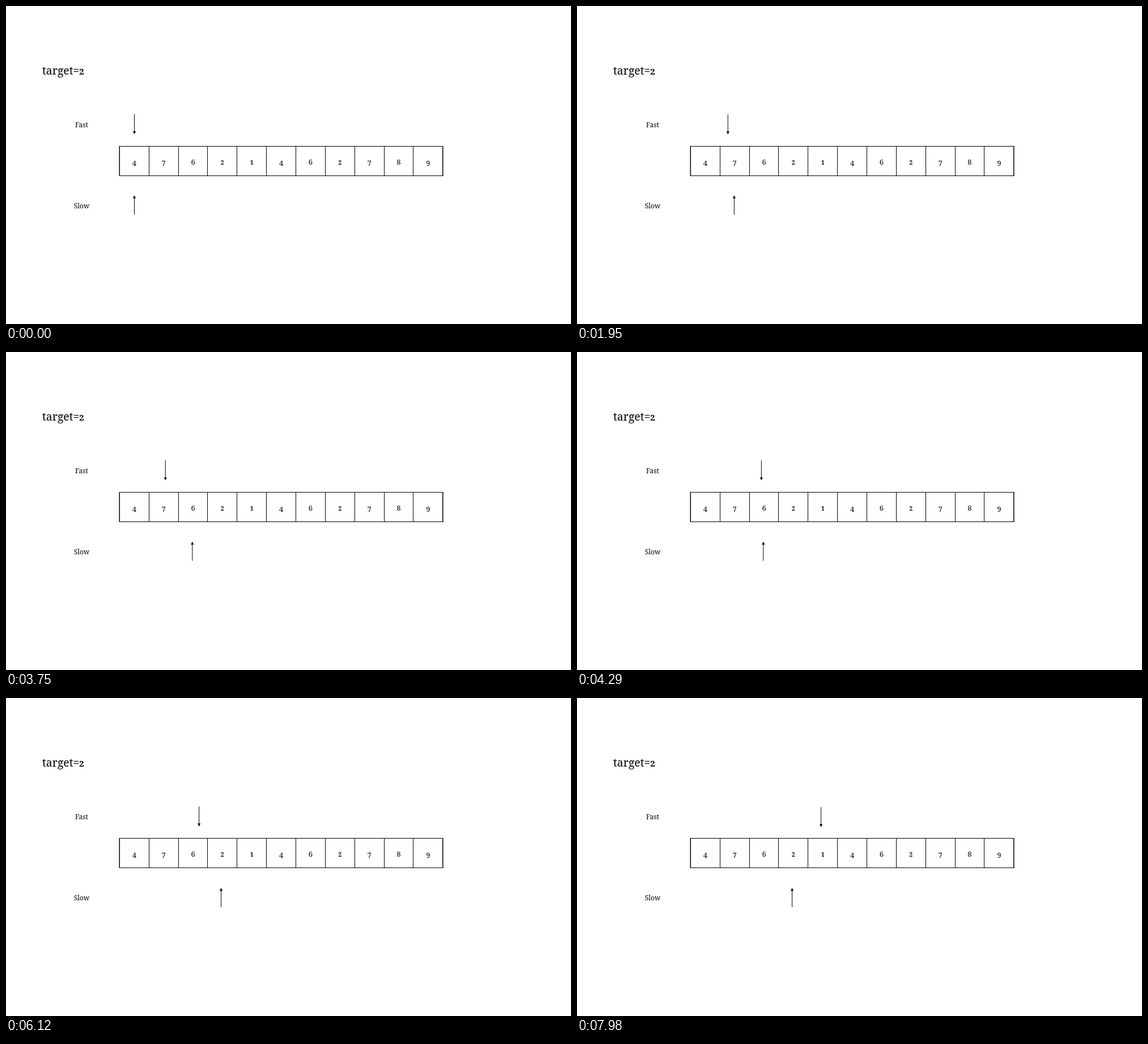
Write an HTML page that moves like this. It is 997 px wide and 561 px high and loops after 8 s.

```html
<!DOCTYPE html>
<html lang="en">
<head>
<meta charset="utf-8">
<title>Fast and slow pointers</title>
<style>
html, body { margin: 0; height: 100%; overflow: hidden; background: #fff; }
svg { display: block; }
text { font: 500 12px "Noto Serif", "Liberation Serif", serif; text-anchor: middle; }
path { fill: none; stroke: #000; }
.head { fill: #000; stroke: none; }
#title { font-size: 19.4px; text-anchor: start; }
#title tspan { font-size: 15.2px; font-weight: 600; }
.digit { font-size: 13px; }
.small { font-size: 10px; font-weight: 600; }
</style>
</head>
<body>
<svg width="997" height="561" viewBox="0 0 997 561">
  <text id="title" x="64" y="120.7">target=<tspan>2</tspan></text>
  <text x="133.4" y="214">Fast</text>
  <text x="133.6" y="356.7">Slow</text>
  <g id="cells"></g>
  <path d="M200 247.5H771.5M200 299.5H771.5"/>
  <path d="M200.3 247V300M770.8 247V300" stroke-width="1.5"/>
  <g id="fast">
    <path d="M0 0V31"/>
    <path class="head" d="M-2.6 30H2.6L0 35.3Z"/>
  </g>
  <g id="slow">
    <path d="M0 4V34"/>
    <path class="head" d="M-2.6 5.3H2.6L0 0Z"/>
  </g>
</svg>
<script>
const LOOP = 8000, STEP = 30, MOVE = 900, CYCLE = 2250;
const LEFT = 200.4, CELL = 51.85;
const fast = document.getElementById('fast');
const slow = document.getElementById('slow');

// resting places [x, y] of each pointer
const fastStops = [[226.5, 191], [278.3, 191.2], [331.3, 191.2], [381.4, 191.9], [432.5, 192.5]];
const slowStops = [[226.5, 334], [277.4, 334], [328.8, 334.4], [379.6, 335]];

// old-style figures: 1 and 2 are low, 4, 7 and 9 hang below the baseline
let cells = '';
[...'47621462789'].forEach((d, i) => {
  const x = LEFT + CELL * (i + 0.5);
  const y = '479'.includes(d) ? 282.4 : 279.7;
  const size = '12'.includes(d) ? 'digit small' : 'digit';
  cells += `<text class="${size}" x="${x}" y="${y}">${d}</text>`;
  if (i) cells += `<path d="M${Math.floor(LEFT + CELL * i) + 0.5} 247V300"/>`;
});
document.getElementById('cells').innerHTML = cells;

// cubic-bezier(.42, 0, .58, 1)
function ease(p) {
  if (p <= 0) return 0;
  if (p >= 1) return 1;
  let lo = 0, hi = 1, u;
  for (let i = 0; i < 24; i++) {
    u = (lo + hi) / 2;
    const x = 1.26 * u * (1 - u) ** 2 + 1.74 * u * u * (1 - u) + u ** 3;
    if (x < p) lo = u; else hi = u;
  }
  return u * u * (3 - 2 * u);
}

// each start time begins a move to the next stop
function place(el, stops, starts, t) {
  let [x, y] = stops[0];
  starts.forEach((start, i) => {
    const k = ease((t - start) / MOVE);
    x += (stops[i + 1][0] - stops[i][0]) * k;
    y += (stops[i + 1][1] - stops[i][1]) * k;
  });
  el.setAttribute('transform', `translate(${x.toFixed(3)} ${y.toFixed(3)})`);
}

const slowStarts = [0, 1, 2].map(i => 450 + CYCLE * i);
const fastStarts = [...slowStarts.map(s => s + MOVE), 7200];

function draw(now) {
  const t = Math.floor((now % LOOP) / STEP) * STEP;
  place(slow, slowStops, slowStarts, t);
  place(fast, fastStops, fastStarts, t);
}

const origin = performance.now();
function tick() {
  draw(performance.now() - origin);
  requestAnimationFrame(tick);
}
tick();
</script>
</body>
</html>
```
